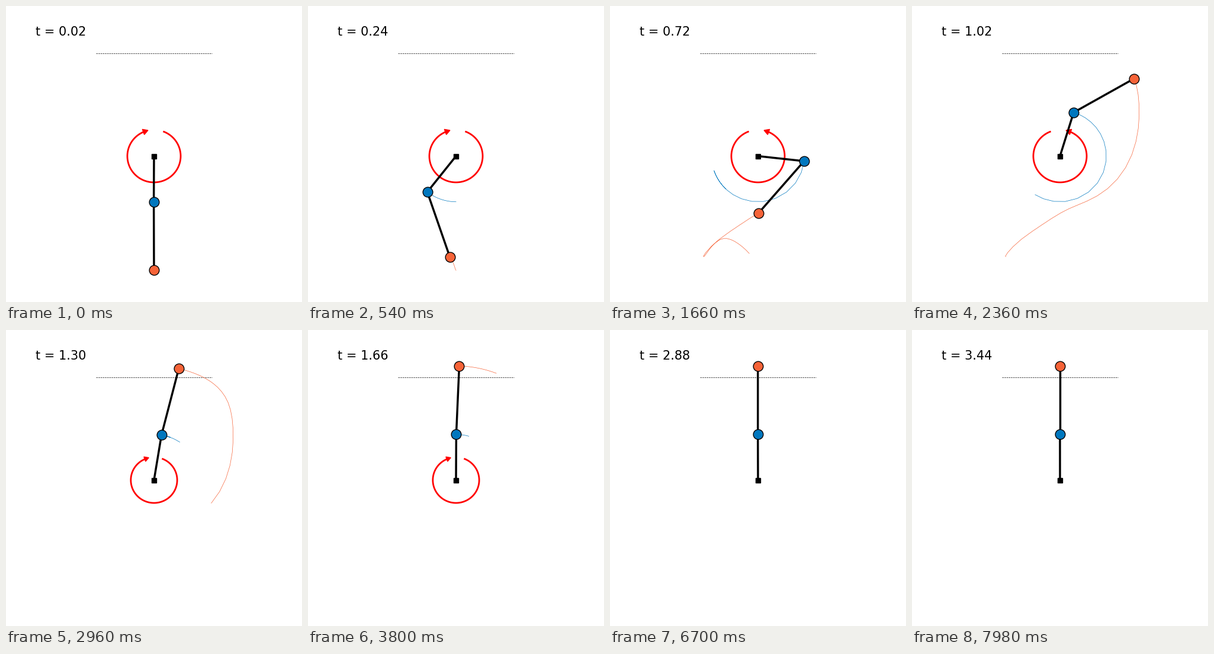
These frames come from a looping animation (500 by 500 pixels, 8000 ms). A matplotlib script:

```python
import numpy as np
import matplotlib.pyplot as plt
from matplotlib.animation import FuncAnimation
from matplotlib.patches import Polygon

L1, L2 = 0.2, 0.3
DT = 0.02
STEPS = 172
TRAIL = 23            # steps kept in each trail
TICK = 20             # ms
SETTLE = 1.2          # from here both links decay towards upright
BLUE, ORANGE = "#0077be", "#f66338"

# key poses of the swing-up: time, upper and lower link angle in degrees,
# counted from hanging down
POSES = [
    (0, 0, 0), (0.14, -13.5, 8.2), (0.26, -44, 19.7), (0.395, -71.4, 8.4),
    (0.46, -65, -1.5), (0.56, -32.4, -25), (0.64, 22, -53.5),
    (0.72, 83.7, -40.8), (0.8, 129, 1), (0.89, 161.7, 59), (0.95, 168, 91),
    (1.02, 162.9, 119.6),
]


def decay(s, start, drift, rate):
    """Angle of a link settling upright, s seconds after SETTLE."""
    return 180 - (start - drift * s) * np.exp(-rate * s)


def spline(t, kt, kv, last_slope):
    """Cubic spline through the keys, starting at rest."""
    h = np.diff(kt)
    rise = np.diff(kv) / h
    n = len(kt)
    A, b = np.eye(n), np.zeros(n)
    b[-1] = last_slope
    for i in range(1, n - 1):
        p, q = 1 / h[i - 1], 1 / h[i]
        A[i, i - 1:i + 2] = p, 2 * (p + q), q
        b[i] = 3 * (p * rise[i - 1] + q * rise[i])
    m = np.linalg.solve(A, b)

    i = np.clip(np.searchsorted(kt, t, side="right") - 1, 0, n - 2)
    s = (t - kt[i]) / h[i]
    return ((1 + 2 * s) * (1 - s) ** 2 * kv[i]
            + s * (1 - s) ** 2 * h[i] * m[i]
            + s * s * (3 - 2 * s) * kv[i + 1]
            + s * s * (s - 1) * h[i] * m[i + 1])


def link_angle(t, column, start, drift, rate):
    keys = np.array([(p[0], p[column]) for p in POSES]
                    + [(SETTLE, 180 - start)])
    swing = spline(np.minimum(t, SETTLE), *keys.T, drift + start * rate)
    settle = decay(np.maximum(t - SETTLE, 0), start, drift, rate)
    return np.radians(np.where(t < SETTLE, swing, settle))


def link_vector(length, angle):
    return length * np.column_stack((np.sin(angle), -np.cos(angle)))


times = np.arange(STEPS + 1) * DT
elbow = link_vector(L1, link_angle(times, 1, 16, 32, 3.2))
tip = elbow + link_vector(L2, link_angle(times, 2, 23.3, 10, 4.4))


def torque(t):
    """Radius of the torque arrow and its direction (1 = counterclockwise)."""
    if t < 0.375:
        return 0.115, -1
    if t < 1.15:
        return 0.115, 1
    if t < 1.95:
        return 0.1, -1
    return 0, 0


def circle(radius, degrees):
    a = np.radians(degrees)
    return radius * np.column_stack((np.cos(a), np.sin(a)))


fig = plt.figure(figsize=(5, 5), dpi=100, facecolor="white")
ax = fig.add_axes([0.03, 0.03, 0.94, 0.9258])
ax.set(xlim=(-0.6, 0.6), ylim=(-0.6, 0.6))
ax.axis("off")

ax.plot([-0.25, 0.25], [0.45, 0.45], "--", color="black", lw=0.5)
trail1, = ax.plot([], [], color=BLUE, lw=0.5)
trail2, = ax.plot([], [], color=ORANGE, lw=0.5)
arc, = ax.plot([], [], color="red", lw=2, zorder=1, solid_capstyle="butt")
head = ax.add_patch(Polygon(np.zeros((3, 2)), color="red", zorder=1.1))
link1, = ax.plot([], [], color="black", lw=2.5)
link2, = ax.plot([], [], color="black", lw=2.5)
ax.plot([0], [0], "s", color="black", ms=6)
ball1, = ax.plot([], [], "o", ms=12, mfc=BLUE, mec="black")
ball2, = ax.plot([], [], "o", ms=12, mfc=ORANGE, mec="black")
clock = fig.text(0.1, 0.9, "", fontsize=15, family="DejaVu Sans")

SWEEP = np.linspace(110, 430, 120)


def draw_arrow(t):
    radius, turn = torque(t)
    arc.set_visible(radius > 0)
    head.set_visible(radius > 0)
    if not radius:
        return
    arc.set_data(*circle(radius, SWEEP).T)
    end = 90 - 20 * turn
    corners = end + 90 * turn + np.array([0, 120, 240])
    head.set_xy(circle(radius, [end]) + circle(radius / 8, corners))


def update(tick):
    # every seven ticks hold three steps; the middle one lasts five ticks
    cycle, part = divmod(tick, 7)
    n = 3 * cycle + (part > 0) + (part > 5) + 1
    p1, p2 = elbow[n], tip[n]
    past = slice(max(0, n - TRAIL), n + 1)
    trail1.set_data(*elbow[past].T)
    trail2.set_data(*tip[past].T)
    link1.set_data([0, p1[0]], [0, p1[1]])
    link2.set_data([p1[0], p2[0]], [p1[1], p2[1]])
    ball1.set_data([p1[0]], [p1[1]])
    ball2.set_data([p2[0]], [p2[1]])
    draw_arrow(times[n])
    clock.set_text(f"t = {times[n]:.2f}")
    return trail1, trail2, arc, head, link1, link2, ball1, ball2, clock


anim = FuncAnimation(fig, update, frames=400, init_func=lambda: update(0),
                     interval=TICK, repeat=True, repeat_delay=0)
plt.show()
```
